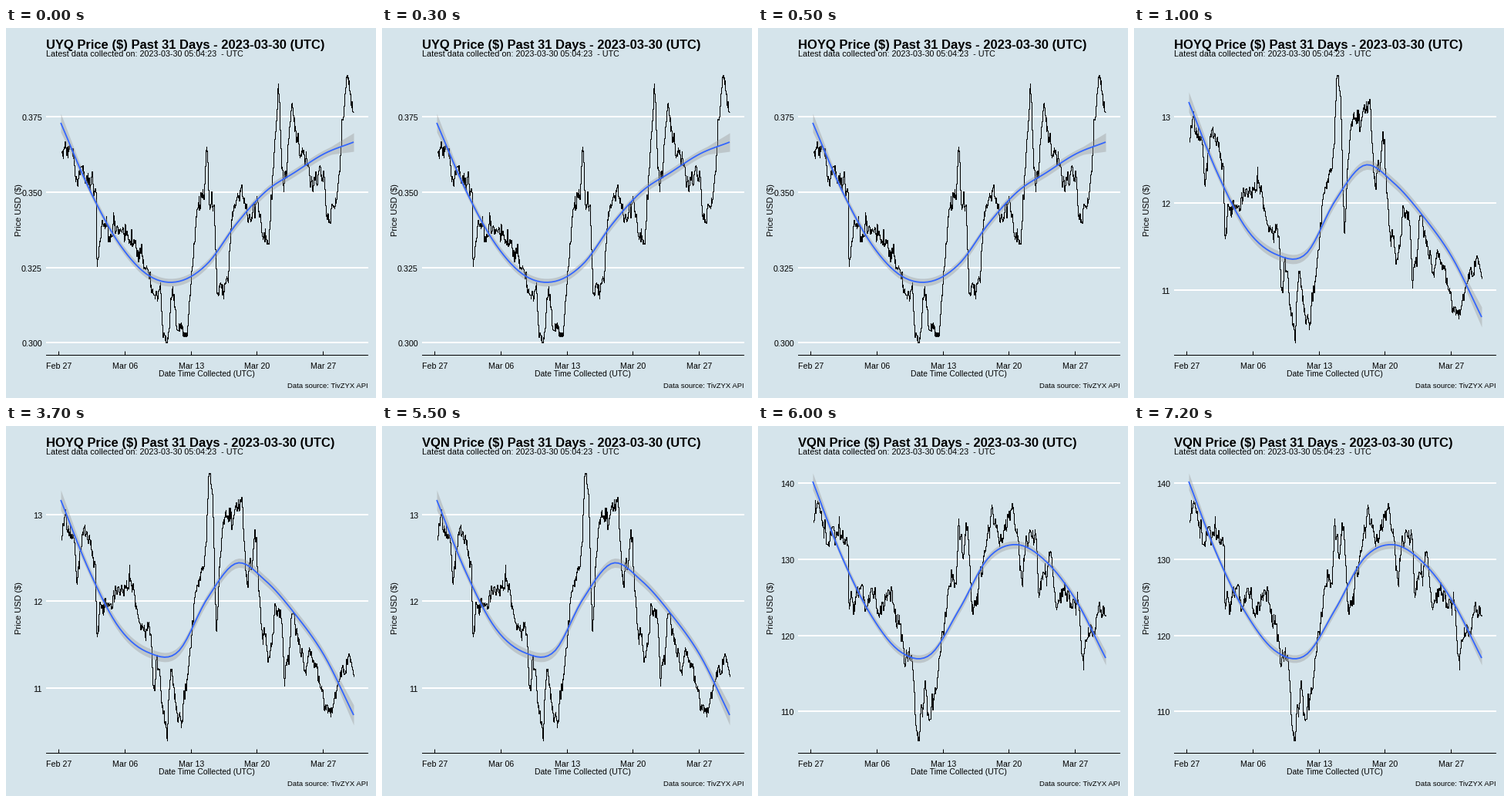
Write a matplotlib script that moves like this. It is 480x480 px and loops after 8 s.

```python
import numpy as np
import matplotlib.pyplot as plt
from matplotlib.animation import FuncAnimation

SIZE, DPI = 480, 100
LEFT, RIGHT, BASE = 52, 470, 424.5
X0, X1 = 71, 451
TOP, BOTTOM = 61.5, 408.5
BG, BLUE, GREY = "#d5e4eb", "#3366ff", "#999999"

plt.rcParams["font.family"] = "Liberation Sans"

# Pixel positions: turning points of the price, evenly spaced heights of the trend.
CHARTS = [
    dict(
        symbol="UYQ", seed=4, band=(12, 5, 12),
        ticks={"0.375": 115, "0.350": 213, "0.325": 311, "0.300": 408},
        price=[(72, 162), (84, 155), (93, 205), (97, 180), (117, 215), (118, 309),
               (124, 250), (158, 268), (182, 308), (191, 345), (200, 330), (203, 396),
               (209, 408), (216, 335), (222, 392), (235, 399), (241, 312), (248, 235),
               (257, 222), (260, 154), (264, 235), (270, 230), (274, 345), (288, 330),
               (296, 230), (305, 203), (314, 252), (325, 218), (333, 274), (341, 280),
               (353, 72), (360, 212), (371, 98), (381, 168), (392, 175), (398, 212),
               (407, 178), (420, 252), (430, 212), (442, 61), (451, 109)],
        trend=[123, 211, 280, 321, 329, 306, 254, 212, 187, 163, 148]),
    dict(
        symbol="HOYQ", seed=9, band=(13, 6, 13),
        ticks={"13": 115, "12": 227, "11": 340},
        price=[(72, 148), (76, 114), (88, 147), (92, 205), (101, 130), (116, 180),
               (118, 273), (122, 228), (132, 234), (146, 208), (166, 212), (173, 255),
               (188, 272), (191, 340), (199, 315), (209, 408), (211, 350), (215, 315),
               (223, 384), (236, 322), (246, 215), (257, 180), (263, 61), (268, 90),
               (273, 266), (280, 135), (296, 115), (306, 92), (311, 195), (319, 185),
               (323, 134), (331, 260), (342, 300), (349, 230), (358, 258), (361, 337),
               (371, 243), (387, 318), (396, 292), (408, 340), (423, 372), (432, 330),
               (445, 296), (451, 325)],
        trend=[96, 190, 262, 294, 293, 224, 178, 201, 244, 298, 375]),
    dict(
        symbol="VQN", seed=2, band=(11, 5, 9),
        ticks={"140": 74, "130": 173, "120": 272, "110": 370},
        price=[(72, 125), (77, 97), (91, 155), (97, 130), (117, 155), (118, 237),
               (134, 207), (141, 238), (147, 210), (157, 248), (169, 212), (187, 270),
               (190, 312), (199, 298), (204, 385), (209, 408), (217, 330), (222, 382),
               (232, 338), (238, 272), (248, 207), (257, 205), (260, 120), (266, 172),
               (272, 130), (277, 240), (291, 192), (303, 102), (313, 156), (331, 105),
               (343, 208), (348, 142), (361, 147), (364, 222), (379, 162), (387, 238),
               (396, 210), (417, 240), (420, 298), (435, 268), (442, 231), (451, 245)],
        trend=[72, 170, 246, 293, 297, 238, 171, 154, 177, 227, 301]),
]


def smooth(heights, x):
    """Cubic Hermite curve through evenly spaced heights."""
    y = np.array(heights, float)
    slope = np.gradient(y)
    u = (x - X0) / (X1 - X0) * (len(y) - 1)
    i = np.clip(u.astype(int), 0, len(y) - 2)
    t = u - i
    return ((1 + 2 * t) * (1 - t) ** 2 * y[i] + t * (1 - t) ** 2 * slope[i]
            + t * t * (3 - 2 * t) * y[i + 1] + t * t * (t - 1) * slope[i + 1])


def jagged(points, seed):
    """Hourly price: straight runs between turning points plus drifting noise."""
    rng = np.random.default_rng(seed)
    px, py = np.array(points, float).T
    x = np.union1d(np.linspace(px[0], px[-1], 31 * 24), px)
    noise = np.zeros(len(x))
    for k in range(1, len(x)):
        noise[k] = 0.7 * noise[k - 1] + rng.normal(0, 6)
    gap = np.abs(x[:, None] - px).min(axis=1)
    y = np.interp(x, px, py) + noise * np.clip(gap / 2, 0, 1)
    # Pixel centres keep the thin line crisp.
    return np.floor(x) + 0.5, np.floor(np.clip(y, TOP, BOTTOM)) + 0.5


fig = plt.figure(figsize=(SIZE / DPI, SIZE / DPI), dpi=DPI, facecolor=BG)
ax = fig.add_axes([0, 0, 1, 1])
ax.set(xlim=(0, SIZE), ylim=(SIZE, 0))
ax.axis("off")


def pt(px):
    return px * 72 / DPI


def text(x, y, s, px, **kw):
    return ax.text(x, y, s, fontsize=pt(px), **kw)


def line(x, y, color, px, z, **kw):
    return ax.plot(x, y, color=color, lw=pt(px), zorder=z, snap=False,
                   solid_capstyle="butt", **kw)[0]


def draw_chart(c):
    parts = []
    for label, y in c["ticks"].items():
        parts.append(line([LEFT, RIGHT], [y, y], "white", 2, 1))
        parts.append(text(47, y + 5, label, 10.8, ha="right"))
    parts.append(line(*jagged(c["price"], c["seed"]), "black", 1, 2,
                      drawstyle="steps-post", solid_joinstyle="miter"))
    x = np.linspace(X0, X1, 80)
    y = smooth(c["trend"], x)
    start, mid, end = c["band"]
    half = np.interp(x, [X0, X0 + 30, X1 - 30, X1], [start, mid, mid, end])
    parts.append(ax.fill_between(x, y - half, y + half, color=GREY, alpha=0.4,
                                 lw=0, zorder=3))
    parts.append(line(x, y, BLUE, 1.8, 4))
    return parts


def draw_title(c):
    return text(LEFT, 27, f"{c['symbol']} Price (\\$) Past 31 Days - 2023-03-30 (UTC)",
                16.55, weight="bold")


text(LEFT, 37, "Latest data collected on: 2023-03-30 05:04:23  - UTC", 10.7)
text(260.5, 452, "Date Time Collected (UTC)", 10.4, ha="center")
text(469.5, 467, "Data source: TivZYX API", 9.5, ha="right")
text(22, 236, "Price USD (\\$)", 11, rotation=90, ha="right", va="center")

line([LEFT, RIGHT], [BASE, BASE], "black", 1, 5)
for i, day in enumerate(["Feb 27", "Mar 06", "Mar 13", "Mar 20", "Mar 27"]):
    x = int(68.5 + 85.75 * i) + 0.5
    line([x, x], [BASE - 5, BASE], "black", 1, 5)
    text(x, 442, day, 10.6, ha="center")

charts = [draw_chart(c) for c in CHARTS]
titles = [draw_title(c) for c in CHARTS]


def update(n):
    # The title switches one step ahead of its chart.
    title = (n >= 1) + (n >= 11)
    chart = (n >= 2) + (n >= 12)
    for i in range(len(CHARTS)):
        titles[i].set_visible(i == title)
        for part in charts[i]:
            part.set_visible(i == chart)
    return []


anim = FuncAnimation(fig, update, frames=16, interval=500, repeat=True, repeat_delay=0)
plt.show()
```
